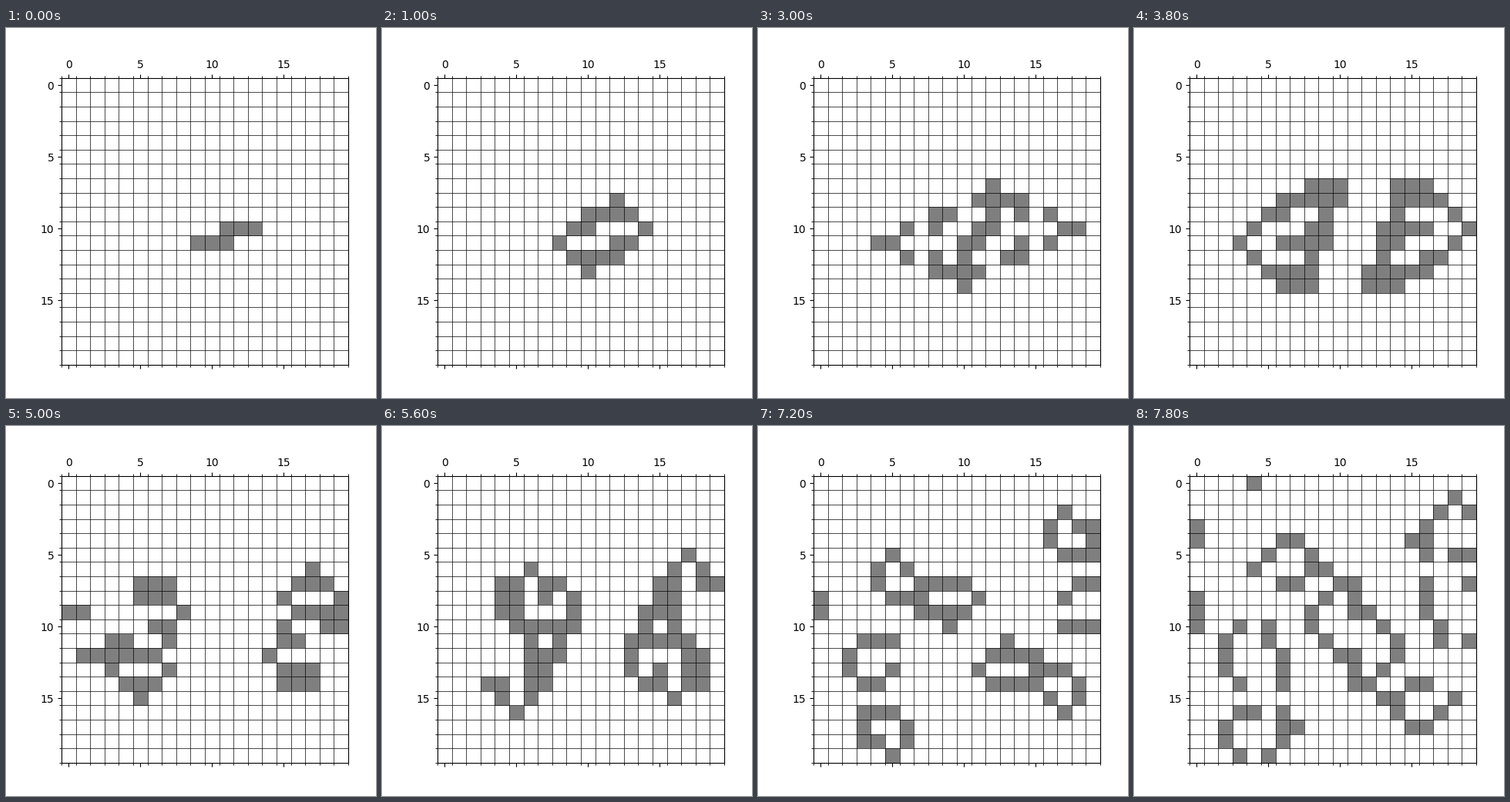
Recreate the animation shown at these times as a matplotlib script. Size 480 px wide and 480 px high, loop 8000 ms.

```python
import numpy as np
import matplotlib.pyplot as plt
from matplotlib.animation import FuncAnimation

SIZE = 20
FRAMES = 40
STEP_MS = 200


def step(grid):
    """One generation of Life on a torus."""
    around = sum(np.roll(grid, (dy, dx), (0, 1))
                 for dy in (-1, 0, 1) for dx in (-1, 0, 1) if dy or dx)
    return ((around == 3) | ((grid == 1) & (around == 2))).astype(int)


start = np.zeros((SIZE, SIZE), int)
start[10, 11:14] = 1
start[11, 9:12] = 1

history = [start]
while len(history) < FRAMES:
    history.append(step(history[-1]))

fig = plt.figure(figsize=(4.8, 4.8), dpi=100)
ax = fig.add_axes((0.15, 0.09, 0.775, 0.775))
image = ax.matshow(start, cmap="binary", vmin=0, vmax=2)

edges = np.arange(-0.5, SIZE, 1)
ax.set_xticks(edges, minor=True)
ax.set_yticks(edges, minor=True)
ax.grid(which="minor", color="k", linestyle="-", linewidth=0.5)


def update(i):
    image.set_data(history[i])
    return [image]


anim = FuncAnimation(fig, update, frames=FRAMES, interval=STEP_MS,
                     repeat=True, repeat_delay=0)
plt.show()
```
